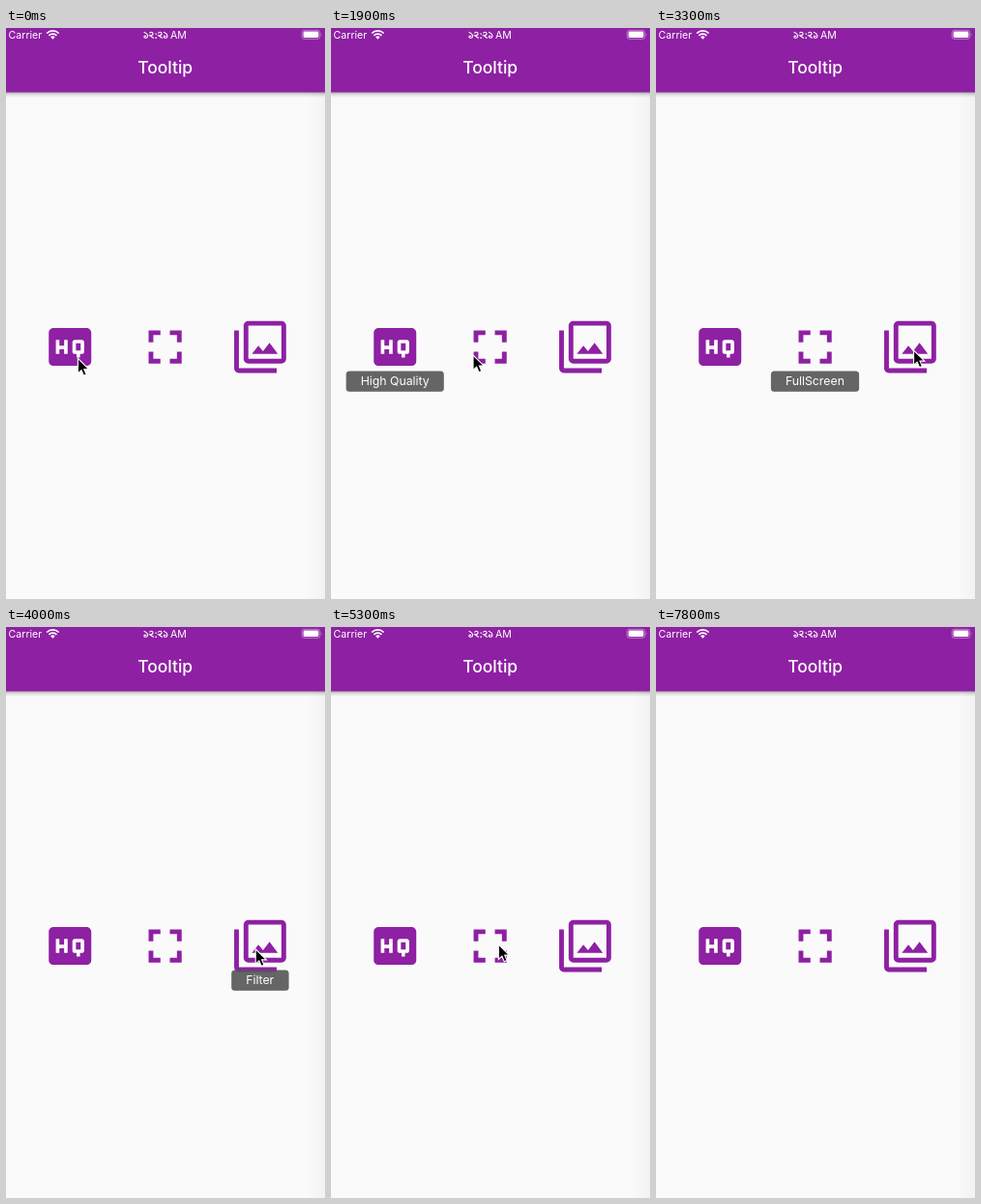
These frames come from a looping animation (330 px wide and 590 px high, 8.5 s). An HTML page:

```html
<!DOCTYPE html>
<html lang="en">
<head>
<meta charset="utf-8">
<title>Tooltip</title>
<style>
  html, body { margin: 0; height: 100%; overflow: hidden; background: #fafafa; }
  svg { display: block; width: 330px; height: 590px; }
  text { font-family: Inter, Roboto, sans-serif; fill: #fff; }
  .status { font-size: 10.6px; }
  .title { font-size: 17.4px; font-weight: 500; text-anchor: middle; }
  .tip { font-size: 12.3px; text-anchor: middle; }
  .tip rect { fill: #565656; fill-opacity: .9; }
  .icon { fill: #8e20a3; }
  .line { fill: none; stroke: #fff; }
</style>
</head>
<body>
<svg viewBox="0 0 330 590">
  <defs>
    <linearGradient id="drop" x2="0" y2="1">
      <stop offset="0" stop-opacity=".36"/>
      <stop offset=".4" stop-opacity=".13"/>
      <stop offset="1" stop-opacity="0"/>
    </linearGradient>
    <linearGradient id="edge">
      <stop offset="0" stop-opacity="0"/>
      <stop offset="1" stop-opacity=".03"/>
    </linearGradient>
    <path id="one" d="M.6 .6C2.2 1.2 4.5 2.6 4.5 4.8C4.5 7.2 .9 7.3 .9 5.3C.9 4 2.7 4 2.7 5.3"/>
    <path id="two" d="M.7 2.2C.7 .1 4 .1 4 2.1C4 3.7 2.4 4.2 .8 4.2L4.8 6.9"/>
  </defs>

  <rect width="330" height="590" fill="#fafafa"/>
  <rect x="311" y="66" width="19" height="524" fill="url(#edge)"/>
  <rect y="66" width="330" height="6" fill="url(#drop)"/>
  <rect width="330" height="66.4" fill="#8e20a3"/>

  <text class="status" x="2.6" y="11">Carrier</text>
  <g class="line" stroke-width="1.7">
    <path d="M42.2 5.5A8.8 8.8 0 0 1 54.6 5.5M44.4 7.8A5.7 5.7 0 0 1 52.4 7.8"/>
  </g>
  <path d="M46.2 9.4A3.1 3.1 0 0 1 50.6 9.4L48.4 11.7Z" fill="#fff"/>
  <g class="line" stroke-width="1.1">
    <use href="#one" x="142" y="3.6"/>
    <use href="#two" x="148" y="3.6"/>
    <use href="#two" x="157" y="3.6"/>
    <use href="#one" x="162.4" y="3.6"/>
  </g>
  <path d="M154.5 5.4h1.4v1.4h-1.4zM154.5 9.6h1.4v1.4h-1.4z" fill="#fff"/>
  <text class="status" x="170" y="11">AM</text>
  <rect class="line" x="306.2" y="2.3" width="18.6" height="9" rx="2.4" stroke-width=".9" stroke-opacity=".45"/>
  <rect x="307.6" y="3.6" width="15.8" height="6.4" rx="1.4" fill="#fff"/>
  <path d="M325.8 5.3q1.4 1.5 0 3z" fill="#fff" fill-opacity=".6"/>
  <text class="title" x="164.7" y="47.2">Tooltip</text>

  <g class="icon">
    <path transform="translate(36.9 300.2) scale(2.444)" d="M19 4H5c-1.11 0-2 .9-2 2v12c0 1.1.89 2 2 2h14c1.1 0 2-.9 2-2V6c0-1.1-.9-2-2-2zm-8 11H9.5v-2h-2v2H6V9h1.5v2.5h2V9H11v6zm7-1c0 .55-.45 1-1 1h-.75v1.5h-1.5V15H14c-.55 0-1-.45-1-1v-4c0-.55.45-1 1-1h3c.55 0 1 .45 1 1v4zm-3.5-.5h2v-3h-2v3z"/>
    <path transform="translate(135.3 300.2) scale(2.444)" d="M7 14H5v5h5v-2H7v-3zm-2-4h2V7h3V5H5v5zm12 7h-3v2h5v-5h-2v3zM14 5v2h3v3h2V5h-5z"/>
    <path transform="translate(233.6 300.2) scale(2.444)" d="M15.96 10.29l-2.75 3.54-1.96-2.36L8.5 15h11l-3.54-4.71zM3 5H1v16c0 1.1.9 2 2 2h16v-2H3V5zm18-4H7c-1.1 0-2 .9-2 2v14c0 1.1.9 2 2 2h14c1.1 0 2-.9 2-2V3c0-1.1-.9-2-2-2zm0 16H7V3h14v14z"/>
  </g>

  <g class="tip" id="quality">
    <rect x="15.6" y="354.4" width="101.2" height="21.4" rx="3.5"/>
    <text x="66.2" y="369.4">High Quality</text>
  </g>
  <g class="tip" id="full">
    <rect x="118.9" y="354.4" width="91.2" height="21.4" rx="3.5"/>
    <text x="164.4" y="369.4">FullScreen</text>
  </g>
  <g class="tip" id="filter">
    <rect x="233.2" y="354.4" width="59.4" height="21.4" rx="3.5"/>
    <text x="262.7" y="369.4">Filter</text>
  </g>
  <path id="cursor" d="M0 0V15.5L3.6 12.2L6 17.8L8.8 16.6L6.4 11.1H11.2Z" stroke="#fff" stroke-width="1.1"/>
</svg>
<script>
const LOOP = 8500, TICK = 100;
const $ = id => document.getElementById(id);

// Times below are in ticks.
const start = [74.4, 341.4];
const moves = [ // first tick, steps, x, y
  [11, 6, 137, 339], [18, 2, 147, 338], [28, 6, 266.6, 333],
  [40, 3, 233, 332], [48, 6, 173.3, 328], [62, 1, 248, 325.4]
];
const cursorEnd = 63;
const shows = [ // tooltip, first tick, end tick, opacity on first and last tick
  ['quality', 8, 20, .86, 1], ['full', 25, 34, .86, 1],
  ['filter', 39, 51, .86, 1], ['full', 58, 78, 1, .6]
];

function cursorAt(tick) {
  let [x, y] = start;
  for (const [first, steps, toX, toY] of moves) {
    const p = Math.min(1, Math.max(0, (tick - first + 1) / steps));
    const e = (1 - Math.cos(Math.PI * p)) / 2;
    x += (toX - x) * e;
    y += (toY - y) * e;
  }
  return [x, y];
}

function draw(now) {
  const tick = Math.floor(now % LOOP / TICK);
  const alpha = { quality: 0, full: 0, filter: 0 };
  for (const [id, first, end, fadeIn, fadeOut] of shows) {
    if (tick >= first && tick < end)
      alpha[id] = tick === first ? fadeIn : tick === end - 1 ? fadeOut : 1;
  }
  for (const id in alpha) $(id).setAttribute('opacity', alpha[id]);
  $('cursor').setAttribute('transform', `translate(${cursorAt(tick)})`);
  $('cursor').setAttribute('opacity', tick < cursorEnd ? 1 : 0);
}

const began = performance.now();
function loop() {
  draw(performance.now() - began);
  requestAnimationFrame(loop);
}
loop();
</script>
</body>
</html>
```
